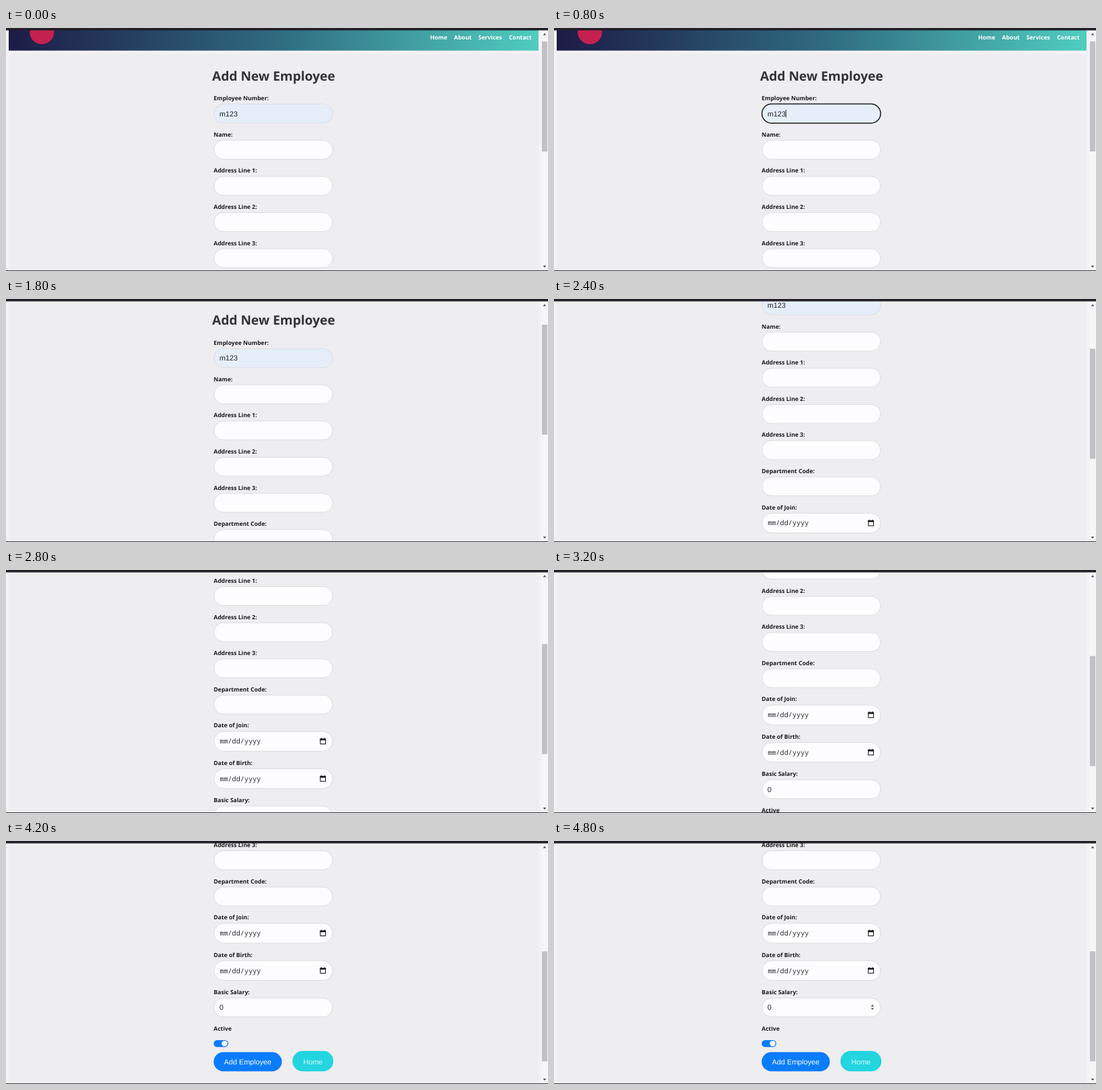
These frames come from a looping animation (800x360 px, 5 s). An HTML page with a canvas:

```html
<!DOCTYPE html>
<html lang="en">
<head>
<meta charset="utf-8">
<title>Add New Employee</title>
<style>
html, body { margin: 0; width: 100%; height: 100%; overflow: hidden; background: #f3f1f5; }
canvas { display: block; width: 800px; height: 360px; }
</style>
</head>
<body>
<canvas id="stage" width="800" height="360"></canvas>
<script>
const ctx = document.getElementById('stage').getContext('2d');
const LOOP = 5000;
const STEP = 39.07;
const SCROLL_TIMES = [1800, 2000, 2200, 2600, 2800, 3000, 3600, 4200];
const LEFT = 306.5, FIELD_W = 176, PITCH = 53.6;
const BOLD = 'bold 8.55px "Noto Sans", "Open Sans", sans-serif';
const TITLE = 'bold 19px "Noto Sans", "Open Sans", sans-serif';
const ARIAL = '10.75px "Liberation Sans", Arial, sans-serif';
const MONO = '10.15px "Noto Sans Mono", "DejaVu Sans Mono", monospace';
const INK = '#1b1a1d';

function rect(x, y, w, h, color) {
  ctx.fillStyle = color;
  ctx.fillRect(x, y, w, h);
}

function pill(x, y, w, h, fill, stroke, line = 1, r = h / 2) {
  ctx.beginPath();
  ctx.roundRect(x, y, w, h, r);
  ctx.fillStyle = fill;
  ctx.fill();
  if (!stroke) return;
  ctx.strokeStyle = stroke;
  ctx.lineWidth = line;
  ctx.stroke();
}

function disc(x, y, r, color) {
  ctx.beginPath();
  ctx.arc(x, y, r, 0, Math.PI * 2);
  ctx.fillStyle = color;
  ctx.fill();
}

function text(str, x, y, font, color, align = 'left') {
  ctx.font = font;
  ctx.fillStyle = color;
  ctx.textAlign = align;
  ctx.fillText(str, x, y);
}

// Small triangle; dir -1 points up, 1 points down
function arrow(x, y, w, h, dir, color) {
  ctx.beginPath();
  ctx.moveTo(x - w / 2, y - dir * h / 2);
  ctx.lineTo(x + w / 2, y - dir * h / 2);
  ctx.lineTo(x, y + dir * h / 2);
  ctx.fillStyle = color;
  ctx.fill();
}

function field(label, labelY, top, h = 29, fill = '#fdfcfe') {
  text(label, LEFT, labelY + 3.2, BOLD, INK);
  pill(LEFT + 0.5, top + 0.5, FIELD_W - 1, h - 1, fill, '#dddce1');
}

function dateField(label, labelY, top) {
  field(label, labelY, top, 30.3);
  const mid = top + 15.1;
  text('mm/dd/yyyy', 315.4, mid + 3.6, MONO, '#2c2b2f');
  ctx.strokeStyle = INK;
  ctx.lineWidth = 1.1;
  ctx.strokeRect(464, mid - 3.4, 7.6, 7.4);
  rect(463.5, mid - 4, 8.6, 2.6, INK);
  rect(464.8, mid - 5, 1.2, 1.4, INK);
  rect(469.6, mid - 5, 1.2, 1.4, INK);
}

function header() {
  const g = ctx.createLinearGradient(4, 0, 786, 0);
  g.addColorStop(0, '#1d1b47');
  g.addColorStop(0.5, '#2f6a80');
  g.addColorStop(1, '#50cdbf');
  rect(4, 0, 782, 33.5, g);
  disc(53, 6, 18, '#c4214f');
  [['Home', 626], ['About', 661.3], ['Services', 697.3], ['Contact', 742.4]]
    .forEach(([s, x]) => text(s, x, 16.8, BOLD, '#ffffff'));
}

function form(t) {
  const focused = t >= 600 && t < 1400;
  text('Add New Employee', 395, 77.5, TITLE, '#333236', 'center');
  ['Employee Number:', 'Name:', 'Address Line 1:', 'Address Line 2:',
    'Address Line 3:', 'Department Code:'].forEach((label, i) =>
    field(label, 104 + PITCH * i, 112.2 + PITCH * i, 29, i ? '#fdfcfe' : '#e6eefa'));
  if (focused) pill(LEFT + 0.4, 112.6, FIELD_W - 0.8, 28.4, '#e6eefa', '#1c1c20', 1.5);
  text('m123', 315, 130.5, ARIAL, '#222226');
  if (focused && t < 1000) rect(341.8, 121, 0.9, 11.5, '#111111');

  dateField('Date of Join:', 425.6, 434);
  dateField('Date of Birth:', 480.9, 489.4);
  field('Basic Salary:', 536, 544.7);
  text('0', 315, 563, ARIAL, '#222226');
  if (t >= 4800) {
    arrow(470, 556.4, 4.6, 2.8, -1, '#55545a');
    arrow(470, 561.4, 4.6, 2.8, 1, '#55545a');
  }

  text('Active', LEFT, 593.2, BOLD, INK);
  pill(LEFT, 607.5, 21.6, 10.3, '#0a7cff');
  disc(322.6, 612.65, 4.2, '#ffffff');
  pill(LEFT, 625.3, 100.6, 28.4, '#0a7cff');
  text('Add Employee', 356.8, 643.2, ARIAL, '#ffffff', 'center');
  pill(422.8, 623.6, 60.4, 30.2, '#22d5df');
  text('Home', 453, 643.2, ARIAL, '#d8fafa', 'center');
}

function scrollbar(offset) {
  rect(790, 0, 10, 360, '#f7f5f8');
  pill(791, 20 + offset * 0.459, 8, 163, '#c1c0c3', null, 0, 0);
  arrow(795, 9, 4.6, 2.8, -1, '#505055');
  arrow(795, 353.5, 4.6, 2.8, 1, '#505055');
}

function draw(t) {
  const offset = STEP * SCROLL_TIMES.filter(s => t >= s).length;
  rect(0, 0, 800, 360, '#f3f1f5');
  ctx.save();
  ctx.translate(0, -offset);
  pill(4, 38, 782, 700, '#eeedef', null, 0, 8);
  header();
  form(t);
  ctx.restore();
  scrollbar(offset);
  rect(0, 0, 800, 3.5, '#221f29');
  rect(0, 359, 800, 1, '#3c3a40');
}

ctx.textRendering = 'geometricPrecision';
const start = performance.now();
function tick() {
  draw((performance.now() - start) % LOOP);
  requestAnimationFrame(tick);
}
tick();
</script>
</body>
</html>
```
